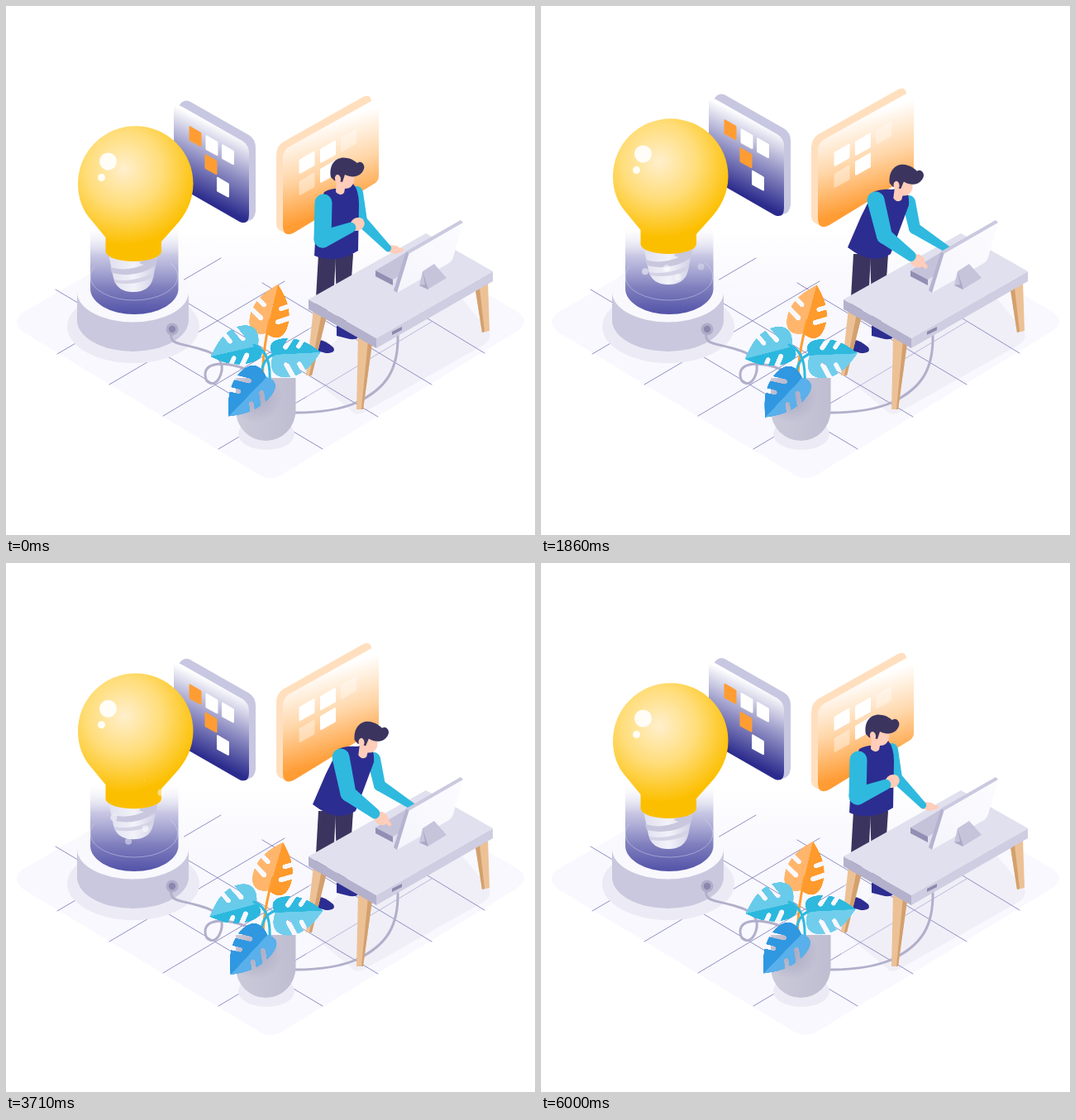
Recreate the animation shown at these times as an HTML page with a canvas. Size 640 by 640 pixels, loop 6.07 s.

```html
<!DOCTYPE html>
<html lang="en">
<head>
<meta charset="utf-8">
<title>Idea workspace</title>
<style>
html, body { margin: 0; width: 100%; height: 100%; overflow: hidden; background: #fff; }
canvas { display: block; width: 100vmin; height: 100vmin; }
</style>
</head>
<body>
<canvas id="stage"></canvas>
<script>
const LOOP = 6070, SIZE = 640;
const stage = document.getElementById('stage');
const ctx = stage.getContext('2d');
const dpr = Math.max(1, window.devicePixelRatio || 1);
stage.width = stage.height = SIZE * dpr;

const SKIN = '#ffcdb9', HAIR = '#3b345f', VEST = '#2c2d90', SLEEVE = '#2fb9df';
const CABLE = '#b1afca', SHADE = '#ecebf5';

const mix = (a, b, k) => a + (b - a) * k;
const mixPt = (a, b, k) => [mix(a[0], b[0], k), mix(a[1], b[1], k)];
const clamp = v => Math.min(1, Math.max(0, v));
const ease = v => { v = clamp(v); return v * v * (3 - 2 * v); };

function shape(d, fill) {
  ctx.fillStyle = fill;
  ctx.fill(new Path2D(d));
}
function line(d, color, width) {
  ctx.strokeStyle = color;
  ctx.lineWidth = width;
  ctx.stroke(new Path2D(d));
}
function oval(x, y, rx, ry, fill, turn = 0) {
  ctx.beginPath();
  ctx.ellipse(x, y, rx, ry, turn, 0, Math.PI * 2);
  ctx.fillStyle = fill;
  ctx.fill();
}
function stops(grad, list) {
  list.forEach(([at, color]) => grad.addColorStop(at, color));
  return grad;
}
const linear = (x1, y1, x2, y2, ...list) => stops(ctx.createLinearGradient(x1, y1, x2, y2), list);
const radial = (x, y, r, ...list) => stops(ctx.createRadialGradient(x, y, 0, x, y, r), list);

function shifted(x, y, draw) {
  ctx.save();
  ctx.translate(x, y);
  draw();
  ctx.restore();
}
function swayed(px, py, turn, dx, dy, draw) {
  ctx.save();
  ctx.translate(px + dx, py + dy);
  ctx.rotate(turn);
  ctx.translate(-px, -py);
  draw();
  ctx.restore();
}

// Tapered rounded segment between two points.
function capsule(a, b, ra, rb, fill) {
  const dir = Math.atan2(b[1] - a[1], b[0] - a[0]);
  const lean = Math.acos(clamp((ra - rb) / Math.hypot(b[0] - a[0], b[1] - a[1])));
  ctx.beginPath();
  ctx.arc(a[0], a[1], ra, dir + lean, dir - lean + Math.PI * 2);
  ctx.arc(b[0], b[1], rb, dir - lean, dir + lean);
  ctx.closePath();
  ctx.fillStyle = fill;
  ctx.fill();
}

function makeLeaf(len, up, down, upColor, downColor) {
  const c = document.createElement('canvas');
  c.width = c.height = 400;
  const g = c.getContext('2d');
  g.scale(4, 4);
  g.translate(20, 50);
  g.lineCap = 'round';
  [[-up, upColor], [down, downColor]].forEach(([w, color]) => {
    g.fillStyle = color;
    g.beginPath();
    g.moveTo(0, 0);
    g.bezierCurveTo(-7, w * 0.6, -1, w * 1.08, len * 0.36, w);
    g.bezierCurveTo(len * 0.68, w * 0.87, len * 0.84, w * 0.4, len, 0);
    g.closePath();
    g.fill();
  });
  // Notches slant from the midrib outwards to the tip.
  g.globalCompositeOperation = 'destination-out';
  [-up, down].forEach(w => {
    [[0.27, 6], [0.54, 5.5]].forEach(([at, wide]) => {
      g.lineWidth = wide;
      g.beginPath();
      g.moveTo(len * at, w * 0.45);
      g.lineTo(len * (at + 0.2), w * 1.3);
      g.stroke();
    });
  });
  return c;
}
function leaf(img, x, y, tx, ty) {
  ctx.save();
  ctx.translate(x, y);
  ctx.rotate(Math.atan2(ty - y, tx - x));
  ctx.drawImage(img, -20, -50, 100, 100);
  ctx.restore();
}
const amberLeaf = makeLeaf(61, 24, 23, '#ffb66c', '#ff9a2c');
const leftLeaf = makeLeaf(59, 18, 28, '#2bb8de', '#68cbea');
const rightLeaf = makeLeaf(58, 19, 28, '#2fb9de', '#70ceec');
const blueLeaf = makeLeaf(66, 20, 27, '#59b0ea', '#2f98e1');

function floor() {
  shape('M20 371 L303 207 Q320 197 337 207 L619 370 Q635 381 619 393 L337 565 Q320 577 303 565 L20 394 Q6 382 20 371Z',
    linear(0, 268, 0, 345, [0, '#f8f8fe00'], [1, '#f8f8fe']));
  shape('M360 441 L418 490 Q425 497 434 491 L578 410 Q592 400 580 388 L540 340 L420 385Z', SHADE + 'b0');
  line('M60 343 L383 536 M221 360 L450 497 M310 335 L515 458 M500 372 L579 420', '#9290c4', 1);
  line('M62 421 L260 305 M125 458 L337 333 M190 496 L366 391 M257 536 L363 473', '#9290c4', 1);
  line('M363 473 L515 382 M366 391 L420 360', '#bbb9dc', 1);
}

function windows(blueY, amberY) {
  shifted(0, blueY, () => {
    shape('M209 121 Q214 112 222 115 L294 156 Q302 161 302 171 V248 Q301 259 292 260 L209 210Z', '#c8c7e1');
    shape('M203 122 Q205 118 212 121 L286 163 Q294 168 294 178 V252 Q294 265 283 261 L203 215Z',
      linear(260, 147, 222, 226, [0, '#fff'], [0.5, '#9190c4'], [1, '#2b2b8d']));
    [[221.5, 145.5, 1], [241.5, 156.5], [261, 167.5], [240.5, 179.5, 1], [255, 207]].forEach(([x, y, hot]) =>
      shifted(x, y, () => shape('M0 1 Q0 -1 2 0 L14 7 Q15 7.5 15 9 V23 Q15 25 13 24 L1 17.5 Q0 17 0 16Z', hot ? '#ff9d33' : '#fff')));
  });
  shifted(0, amberY, () => {
    shape('M327 181 Q327 169 336 164 L432 110 Q440 106 442 114 V200 L340 275 Q327 272 327 264Z', '#ffdfbe');
    shape('M335 184 Q335 175 343 170 L442 115 L451 116 V205 Q451 211 447 214 L349 274 Q335 281 335 266Z',
      linear(335, 158, 367, 259, [0, '#fff'], [0.5, '#ffd6a8'], [1, '#ff9c34']));
    [[354.5, 185.5, 1], [380, 172.5, 1], [405, 159, 0.35], [354.5, 211.5, 0.4], [380, 196.5, 1]].forEach(([x, y, a]) =>
      shifted(x, y, () => shape('M0 1 L1 0 L18 -10 Q19 -10 19 -9 V6 Q19 8 18 8 L2 17 Q0 18 0 16Z', `rgba(255,255,255,${a})`)));
  });
}

function pedestal() {
  oval(154, 388, 80, 44, SHADE);
  shape('M86 346 V380 A67.5 38 0 0 0 221 380 V346Z', '#cac8de');
  oval(153.5, 346, 67.5, 36.5, '#f8f8fd');
  shape('M102 262 H208.5 V342 A53.25 31 0 0 1 102 342Z',
    linear(0, 264, 0, 374, [0, '#ffffff00'], [0.35, '#b9b8dccc'], [0.7, '#7f7ebd'], [1, '#5151a8']));
  ctx.beginPath();
  ctx.ellipse(155, 327, 53, 29, 0, -0.6, Math.PI + 0.4);
  ctx.strokeStyle = 'rgba(225,225,250,.45)';
  ctx.lineWidth = 1;
  ctx.stroke();
}

function bulb(y) {
  shifted(0, y, () => {
    shape('M124 300 H184 L178 329 Q174 346 154 346 Q134 346 130 329Z',
      linear(126, 0, 184, 0, [0, '#e1e1f0'], [0.5, '#f2f2fa'], [1, '#cfcee4']));
    shape('M126 316 Q145 322 167 313 Q150 309 183 305 L181 314 Q157 330 128 323Z', '#c8c7de');
    shape('M131 331 Q156 335 179 322 L178 328 Q158 339 132 335Z', '#d4d3e6');
    shape('M87 215 A69.75 69.75 0 0 1 226.5 215 C226.5 236 217 253 205 266 L188 285 V297 A33.75 12 0 0 1 120.5 297 V280 L104 260 C93 248 87 233 87 215Z',
      radial(143, 197, 92, [0, '#ffefcd'], [0.5, '#ffdd79'], [1, '#fcbf00']));
    oval(123.5, 188, 10.5, 10.5, 'rgba(255,255,255,.9)');
    oval(115.5, 207.5, 4.5, 4.5, 'rgba(255,255,255,.9)');
  });
}

// x and y where each bubble vanishes, when it vanishes, rise speed, sideways drift
const BUBBLES = [
  [168, 259, 3800, 0.051, 0.004], [186, 243, 4450, 0.047, -0.002],
  [129, 275, 4450, 0.045, -0.002], [182, 254, 4750, 0.065, 0.013],
  [160, 257, 4900, 0.067, 0.010], [152, 258, 3040, 0.050, 0],
  [196, 252, 3130, 0.050, 0.002], [168, 268, 3060, 0.050, 0.002],
  [126, 270, 2950, 0.047, 0]
];
function bubbles(t) {
  BUBBLES.forEach(([x, y, end, rise, drift]) => {
    const left = end - t;
    if (left < 0 || left > 1450) return;
    const alpha = 0.5 * clamp((1450 - left) / 300);
    const r = 4 * clamp(left / 650);
    oval(x - drift * left, y + rise * left, r, r, `rgba(255,255,255,${alpha})`);
  });
}

function cables() {
  line('M200 394 C197 411 211 407 238 416 C266 424 263 440 258 450 C252 461 241 457 241 446 C241 430 266 430 292 440', CABLE, 3);
  oval(201, 391, 7.5, 7.5, '#aeacc9');
  oval(201, 391, 4.2, 4.2, '#8a87ae');
}

function desk() {
  const WOOD = '#ecc196', DARK = '#d3a06e';
  shape('M372 366 L388 374 L370 447 H363Z', WOOD);
  shape('M382 372 L388 375 L370 447 H367Z', DARK);
  shape('M568 344 L583 334 L585 393 L576 395Z', WOOD);
  shape('M568 344 L573 341 L579 394 L576 395Z', DARK);
  line('M474 398 C475 440 460 462 426 479 C404 489 378 492 350 492', CABLE, 3);
  shape('M426 399 L443 408 L432 488 H424Z', WOOD);
  shape('M438 405 L443 408 L432 488 H430Z', DARK);
  shape('M366 355 L448 402 V414 L366 367Z', '#b3b1cc');
  shape('M448 402 L589 321 V333 L448 414Z', '#cfcde1');
  shape('M366 355 L508 275 L589 321 L448 402Z', '#e1e0ee');
  shape('M467 394 L479 388 V392 L467 398Z', '#8b89ac');
  shape('M447 320 L484 298 L500 313 L468 331Z', '#c5c3da');
  shape('M447 320 L468 331 V338 L447 327Z', '#918fb3');
}

function monitor() {
  shape('M487 299 L553 262 L541 304 Q540 308 536 311 L473 347Z', linear(480, 340, 552, 265, [0, '#f5f5fc'], [1, '#fcfcff']));
  shape('M484 297 L550 259 L553 262 L487 300Z', '#cac9df');
  shape('M484 297 L487.5 299.5 L473 347 L469 344Z', '#b5b3cf');
  shape('M504 321 L518 312 L533 329 L510 343 L500 338Z', '#c6c4db');
  shape('M504 321 L511 343 L500 338 L507 337Z', '#aaa8c5');
}

function legs() {
  shape('M378 300 H399 L397 340 L385 380 L374 404 V370Z', HAIR);
  shape('M398 300 H420 L417 345 L411 388 H401Z', HAIR);
  shape('M378 404 Q386 404 396 413 Q400 420 387 420 L376 417Z', VEST);
  shape('M400 387 Q413 388 425 398 Q429 404 416 403 L400 399Z', VEST);
}

function torso(p) {
  const pts = [
    [385, 225, 402, 225], [395, 220, 412, 221], [404, 221, 424, 222], [420, 215, 438, 220],
    [427, 223, 446, 224], [427, 240, 445, 241], [426, 296, 423, 300], [400, 313, 400, 315],
    [373, 302, 371, 292], [376, 250, 387, 255]
  ].map(([a, b, c, d]) => [mix(a, c, p), mix(b, d, p)]);
  const [a, b, c, d, e, f, g, h, i, j] = pts;
  shape(`M${a} Q${b} ${c} L${d} Q${e} ${f} L${g} Q${h} ${i} L${j}Z`, VEST);
}

function head(p) {
  swayed(404, 222, 0.08 * p, 27.5 * p, 8 * p * p, () => {
    shape('M400 204 L421 198 L421 212 Q419 221 410 221 L409 226 Q404 231 399 225Z', SKIN);
    shape('M393 207 C390 190 401 181 413 184 C419 185 422 188 425 190 C430 186 435 193 433 197 C430 206 420 209 410 204 L407 213 L403 212 L397 211Z', HAIR);
    oval(401.5, 209, 3.5, 5, SKIN, -0.2);
  });
}

function farArm(p) {
  const s = mixPt([424, 226], [445, 237], p);
  const e = mixPt([430, 260], [452, 269], p);
  const w = mixPt([462, 293], [491, 294], p);
  const hand = [w[0] + 9, w[1] + 2];
  capsule(w, hand, 4, 5, SKIN);
  capsule(hand, [w[0] + 17, w[1] + 2.5], 4, 2, SKIN);
  capsule(s, e, 8, 7, SLEEVE);
  capsule(e, w, 7, 4.2, SLEEVE);
}

function nearArm(p, reach) {
  const bow = 4 * p * (1 - p);
  const s = mixPt([384, 238], [405, 235], p);
  const e = mixPt([383, 282], [414, 279], p);
  const w = mixPt([417, 268], [446, 303], p);
  w[0] += 5 * bow + 11 * reach;
  w[1] += 5 * bow - 4 * reach;
  e[0] += 11 * reach;
  e[1] -= 5 * reach;
  const hx = w[0] + 8, hy = w[1] + mix(-4, 6, p);
  oval(hx, hy, 9, 7.8, SKIN, mix(-0.5, 0.5, p));
  capsule([hx + 3, hy], [hx + mix(5, 10, p), hy + mix(-5, 7, p)], 3.5, 2.2, SKIN);
  capsule(s, e, 10.5, mix(10.5, 9.5, p), SLEEVE);
  capsule(e, w, mix(10.5, 9.5, p), 6.3, SLEEVE);
}

function plant(k) {
  oval(315, 518, 34, 19, SHADE);
  shape('M278 450 H350.5 V489 A36.25 37 0 0 1 278 489Z', linear(278, 0, 350, 0, [0, '#cbcada'], [1, '#bfbdd1']));
  shape('M278 450 H350 V489 A36 37 0 0 1 278 489Z', radial(302, 472, 32, [0, '#9d9bb6b0'], [1, '#9d9bb600']));
  swayed(312, 455, 0.058 * k, 0, 0, () => {
    leaf(amberLeaf, 315, 396, 329, 337);
    line('M311 455 Q309 425 319 380', '#ff9d2e', 3);
  });
  swayed(318, 425, -0.045 * k, -1.5 * k, k, () => {
    leaf(leftLeaf, 305, 411, 248, 424);
  });
  swayed(318, 425, 0.015 * k, 3 * k, k, () => {
    leaf(rightLeaf, 323, 422, 380, 419);
  });
  line('M319 459 C320 436 318 417 300 410 M309 448 Q309 427 325 421', SLEEVE, 3);
  swayed(316, 450, -0.02 * k, 1.5 * k, k, () => {
    leaf(blueLeaf, 315, 449, 270, 496);
  });
}

function draw(t) {
  const phase = Math.PI * 2 * t / LOOP;
  const k = (1 - Math.cos(phase)) / 2;
  const lift = -13.3 * k;
  const blueY = -1.4 - 6.5 * Math.cos(phase - Math.PI * 2 * 1760 / LOOP);
  const lean = ease((t - 250) / 750) - ease((t - 3930) / 730);
  const reach = Math.sin(Math.PI * clamp((t - 1600) / 2150)) ** 2;

  ctx.setTransform(dpr, 0, 0, dpr, 0, 0);
  ctx.fillStyle = '#fff';
  ctx.fillRect(0, 0, SIZE, SIZE);
  ctx.lineCap = 'round';

  floor();
  windows(blueY, lift);
  pedestal();
  bulb(lift);
  bubbles(t);
  cables();
  legs();
  desk();
  farArm(lean);
  torso(lean);
  head(lean);
  nearArm(lean, reach);
  monitor();
  plant(k);
}

function tick() {
  draw(performance.now() % LOOP);
  requestAnimationFrame(tick);
}
tick();
</script>
</body>
</html>
```
